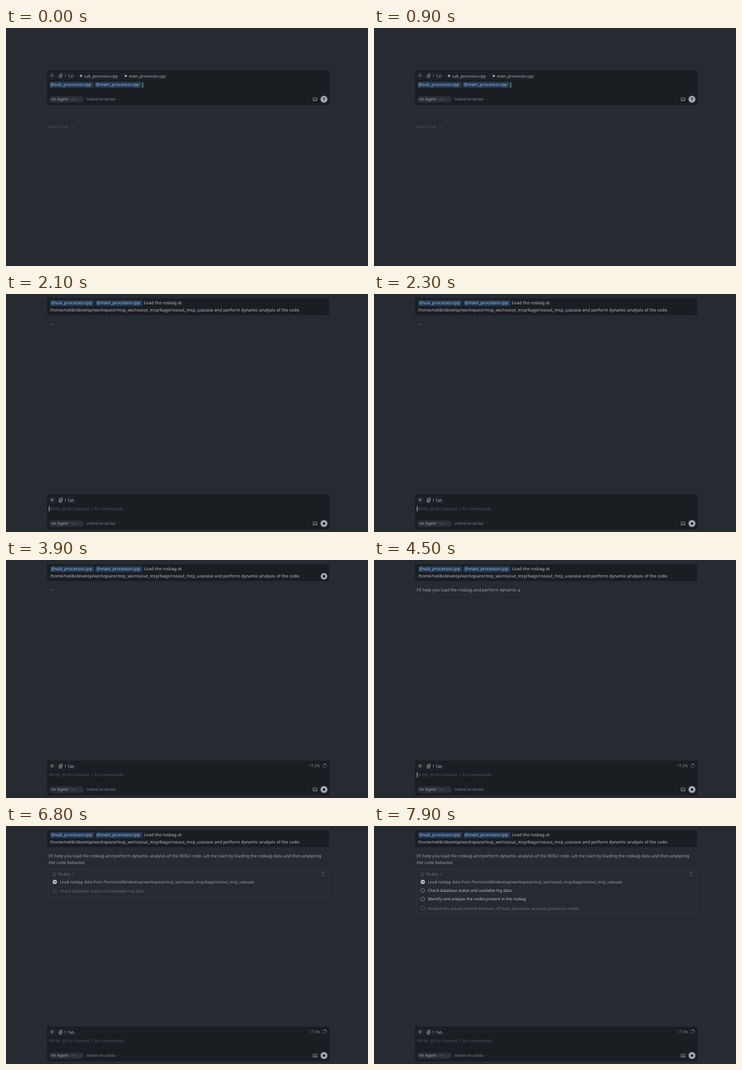
Recreate the animation shown at these times as an HTML page. Size 600x394 px, loop 8000 ms.

```html
<!DOCTYPE html>
<html lang="en">
<head>
<meta charset="utf-8">
<title>Agent chat</title>
<style>
  html, body { margin: 0; width: 100%; height: 100%; overflow: hidden; background: #262b31; }
  svg { display: block; width: 100vw; height: 100vh; }
  text { font-family: "Noto Sans", "Open Sans", sans-serif; text-rendering: geometricPrecision; white-space: pre; }
</style>
</head>
<body>
<svg id="stage" viewBox="0 0 600 394"></svg>
<script>
const LOOP = 8000, BLINK = 600, TASK_FADE = 230;
const PASTE = 1400, SUBMIT = 2100, USAGE = 3600, SETTLED = 4400, REPLY = 4500, STATUS = 4900, TODOS = 6200;
const BODY = 7.13, SMALL = 6.58;

const WORKDIR = '/home/nelib/develop/workspace/mcp_ws/rosout_mcp/bags/rosout_mcp_usecase';
const REPLY_LINES = [
  "I'll help you load the rosbag and perform dynamic analysis of the ROS2 code. Let me start by loading the rosbag data and then analyzing",
  'the code behavior.'
];
const TASKS = [
  { label: `Load rosbag data from ${WORKDIR}`, start: 6150 },
  { label: 'Check database status and available log data', start: 6705 },
  { label: 'Identify and analyze the nodes present in the rosbag', start: 7350 },
  { label: 'Analyze the actual runtime behavior of main_processor and sub_processor nodes', start: 7790 }
];

const text = (x, y, str, fill, size = SMALL, extra = '') =>
  `<text x="${x}" y="${y}" font-size="${size}" fill="${fill}" ${extra}>${str}</text>`;
const box = (x, y, w, h, fill, stroke = 'none', r = 2, extra = '') =>
  `<rect x="${x}" y="${y}" width="${w}" height="${h}" rx="${r}" fill="${fill}" stroke="${stroke}" stroke-width=".7" ${extra}/>`;
const dot = (x, y, r, fill, extra = '') => `<circle cx="${x}" cy="${y}" r="${r}" fill="${fill}" ${extra}/>`;
const line = (d, stroke, width = .7) =>
  `<path d="${d}" fill="none" stroke="${stroke}" stroke-width="${width}" stroke-linecap="round" stroke-linejoin="round"/>`;
const group = (id, content, extra = '') => `<g id="${id}" ${extra}>${content}</g>`;
const caret = (id, x, y) => box(x, y, .8, 9, '#d5d8da', 'none', 0, `id="${id}"`);

// Two file mentions and the start of the request; (x, y) is the first baseline.
const request = (x, y) =>
  box(x - 1.8, y - 7.4, 73, 10, '#243852') + text(x, y, '@sub_processor.cpp', '#a3c0e0', BODY) +
  box(x + 73.6, y - 7.4, 78, 10, '#243852') + text(x + 75.2, y, '@main_processor.cpp', '#a3c0e0', BODY);
const prompt = (x, y) =>
  text(x + 153.6, y, 'Load the rosbag at', '#bcbfc2', BODY) +
  text(x - 2.2, y + 11.4, `${WORKDIR} and perform dynamic analysis of the code.`, '#bcbfc2', BODY);

const contextChips = color =>
  box(71.5, 74.3, 10.5, 10, 'none', '#30353b') + text(73.6, 81.3, '@', color, 6.8) +
  box(85, 74.3, 31.2, 10, 'none', '#2b3036') +
  box(89.6, 76, 3.8, 4.8, '#3c4147', color, .8) + line('M88.2 77.8v4.6h3.6', color, .9) +
  text(96.4, 81.5, '1 Tab', color, 6.7);

const fileChip = (x, w, name) =>
  box(x, 74.3, w, 10, 'none', '#30353b') + dot(x + 6, 79.2, 2, '#8fa2b3') +
  text(x + 11, 81.5, name, '#b9bcc0');

const footer = icon =>
  box(71.3, 112.8, 57.6, 10.6, '#2a2f35', 'none', 5) +
  line('M79 118C77.7 115.8 75.7 116 75.7 118S77.7 120.2 79 118S82.3 116 82.3 118S80.3 120.2 79 118Z', '#a2a6aa') +
  text(85, 120.3, 'Agent', '#a9adb1', SMALL, 'font-weight="500"') +
  text(106, 120.1, 'Ctrl+I', '#62676d', 5) +
  line('M123 117.6l1 1l1-1M186 117.6l1 1l1-1', '#565b61', .6) +
  text(133.2, 120.3, 'ondrel-4-cantos', '#858a8f') +
  box(509, 115.4, 6.6, 5.2, 'none', '#a9adb1', .8) + line('M509.4 120l2-2.3l1.3 1.3l1-.9l1.6 1.8', '#a9adb1') +
  dot(527, 118, 6.2, '#62676c') + dot(527, 118, 5, '#b1b4b7') + icon;

const stopSquare = (x, y) => box(x - 1.9, y - 1.9, 3.8, 3.8, '#1b1f24', 'none', .5);

const draft =
  box(67.3, 69.3, 469.6, 59, '#1a1e23', '#2e3339', 3, 'id="draftBox"') +
  contextChips('#8b9095') + fileChip(118.3, 71.6, 'sub_processor.cpp') + fileChip(192.5, 74.4, 'main_processor.cpp') +
  request(73.6, 96.4) + group('pasted', prompt(73.6, 96.4)) + caret('draftCaret', 226.4, 89.8) +
  group('draftFoot', footer(line('M527 120.8v-5.4M524.6 117.6l2.4-2.4l2.4 2.4', '#1b1f24', 1)) +
    text(71, 166.3, 'Past Chats', '#50555b') + line('M108.6 162.6l1.4 1.4l-1.4 1.4', '#50555b'));

const composer =
  box(67.3, 69.3, 469.6, 59, '#1a1e23', '#2e3339', 3) + contextChips('#b0b4b8') +
  text(71.6, 96.4, 'Write, @ for context, / for commands', '#50555b', BODY) +
  caret('composerCaret', 71, 89.2) + footer(stopSquare(527, 118)) +
  group('usage', text(502, 81.4, '17.5%', '#858a8f') +
    dot(528, 78.6, 2.9, 'none', 'stroke="#4d5258"') +
    dot(528, 78.6, 2.9, 'none', 'stroke="#c0c3c6" pathLength="100" stroke-dasharray="17.5 100" transform="rotate(-90 528 78.6)"'));

const taskRow = ({ label }, i) => {
  const y = 92.4 + i * 14.3;
  const icon = i
    ? dot(80.8, y, 3.2, 'none', 'stroke="#9a9ea2" stroke-width=".7"')
    : dot(80.8, y, 3.5, '#c9cccf') + line(`M79 ${y}h3.4M81.2 ${y - 1.3}l1.3 1.3l-1.3 1.3`, '#262b31', .8);
  return group('task' + i, icon + text(89.3, y + 2.2, label, i ? '#c3c6c9' : '#a4a8ac'));
};

const todos =
  box(70.3, 72.3, 463.6, 30, 'none', '#343a40', 2, 'id="todoBox"') +
  line('M79.2 77.8h3M79.2 80h3M79.2 82.2h3M76.8 77.8h.4M76.8 80h.4M76.8 82.2h.4', '#6d7277') +
  text(86, 82.3, 'To-dos', '#777c81') + text(110, 82.3, '', '#565b61', SMALL, 'id="todoCount"') +
  line('M523.4 78.6l2-2l2 2M523.4 81.2l2 2l2-2', '#858a8f') + TASKS.map(taskRow).join('');

const stage = document.getElementById('stage');
stage.innerHTML =
  `<defs><linearGradient id="shimmer" gradientUnits="userSpaceOnUse" x1="-40" x2="40">
    <stop offset="0" stop-color="#5a5f65"/><stop offset=".5" stop-color="#9a9ea2"/><stop offset="1" stop-color="#5a5f65"/>
  </linearGradient></defs>` +
  box(0, 0, 600, 394, '#262b31', 'none', 0) + box(0, 0, 1, 394, '#31363c', 'none', 0) +
  group('draft', draft) +
  group('chat',
    box(67.3, 6.3, 469, 29.4, '#1a1e23', '#2e3339', 3) + request(74.8, 17.4) + prompt(74.8, 17.4) +
    group('bubbleStop', dot(527, 27, 5.4, '#a9acaf') + stopSquare(527, 27)) +
    group('typing', [0, 1, 2].map(i => dot(73.2 + i * 2.1, 50.3, .55, '#a9adb1', `id="dot${i}"`)).join('')) +
    REPLY_LINES.map((_, i) => text(70.8, 51.5 + i * 11.4, '', '#a2a6aa', 7.075, `id="reply${i}"`)).join('') +
    text(69.2, 79.3, '<tspan font-weight="500">Updating</tspan> to-do list', 'url(#shimmer)', SMALL, 'id="status"') +
    group('todos', todos) + group('composer', composer, 'transform="translate(0 262)"'));

const el = {};
stage.querySelectorAll('[id]').forEach(node => el[node.id] = node);
const show = (id, on) => el[id].style.display = on ? '' : 'none';
const shift = (id, x, y) => el[id].setAttribute('transform', `translate(${x} ${y})`);
const clamp = v => Math.min(1, Math.max(0, v));

function drawDraft(t) {
  const pasted = t >= PASTE, grow = pasted ? 11.3 : 0;
  show('pasted', pasted);
  el.draftBox.setAttribute('height', 59 + grow);
  shift('draftFoot', 0, grow);
  shift('draftCaret', pasted ? 261.6 : 0, grow);
  show('draftCaret', pasted ? t < PASTE + BLINK : t < 300 || t >= 300 + BLINK);
}

function drawTyping(t) {
  const phase = (t + 700) % 1000;
  for (let i = 0; i < 3; i++) {
    shift('dot' + i, 0, -1.4 * Math.sin(Math.PI * clamp((phase - i * 200) / 400)));
  }
}

function drawReply(t) {
  const step = Math.floor((t - REPLY) / 100) + 1;
  const total = REPLY_LINES.join('').length;
  let left = Math.round(total * clamp(step / 3));
  REPLY_LINES.forEach((str, i) => {
    el['reply' + i].textContent = str.slice(0, Math.max(0, left));
    left -= str.length;
  });
}

function drawTodos(t) {
  const count = TASKS.filter(task => t >= task.start).length;
  TASKS.forEach((task, i) => {
    const shown = clamp((t - task.start) / TASK_FADE);
    el['task' + i].setAttribute('opacity', shown);
    shift('task' + i, 0, 2 * (1 - shown));
  });
  el.todoCount.textContent = count;
  el.todoBox.setAttribute('height', 16 + 14.3 * count);
}

function render(t) {
  const sent = t >= SUBMIT;
  show('draft', !sent);
  show('chat', sent);
  if (!sent) return drawDraft(t);
  show('composerCaret', Math.floor((t - SUBMIT) / BLINK) % 2 === 0);
  show('usage', t >= USAGE);
  show('bubbleStop', t >= USAGE && t < SETTLED);
  show('typing', t < REPLY);
  show('status', t >= STATUS && t < TODOS);
  show('todos', t >= TODOS);
  shift('shimmer', 0, 0);
  el.shimmer.setAttribute('gradientTransform', `translate(${92 + (t - 5500) * .06} 0)`);
  drawTyping(t);
  drawReply(t);
  drawTodos(t);
}

const began = performance.now();
function frame() {
  render((performance.now() - began) % LOOP);
  requestAnimationFrame(frame);
}
frame();
</script>
</body>
</html>
```
